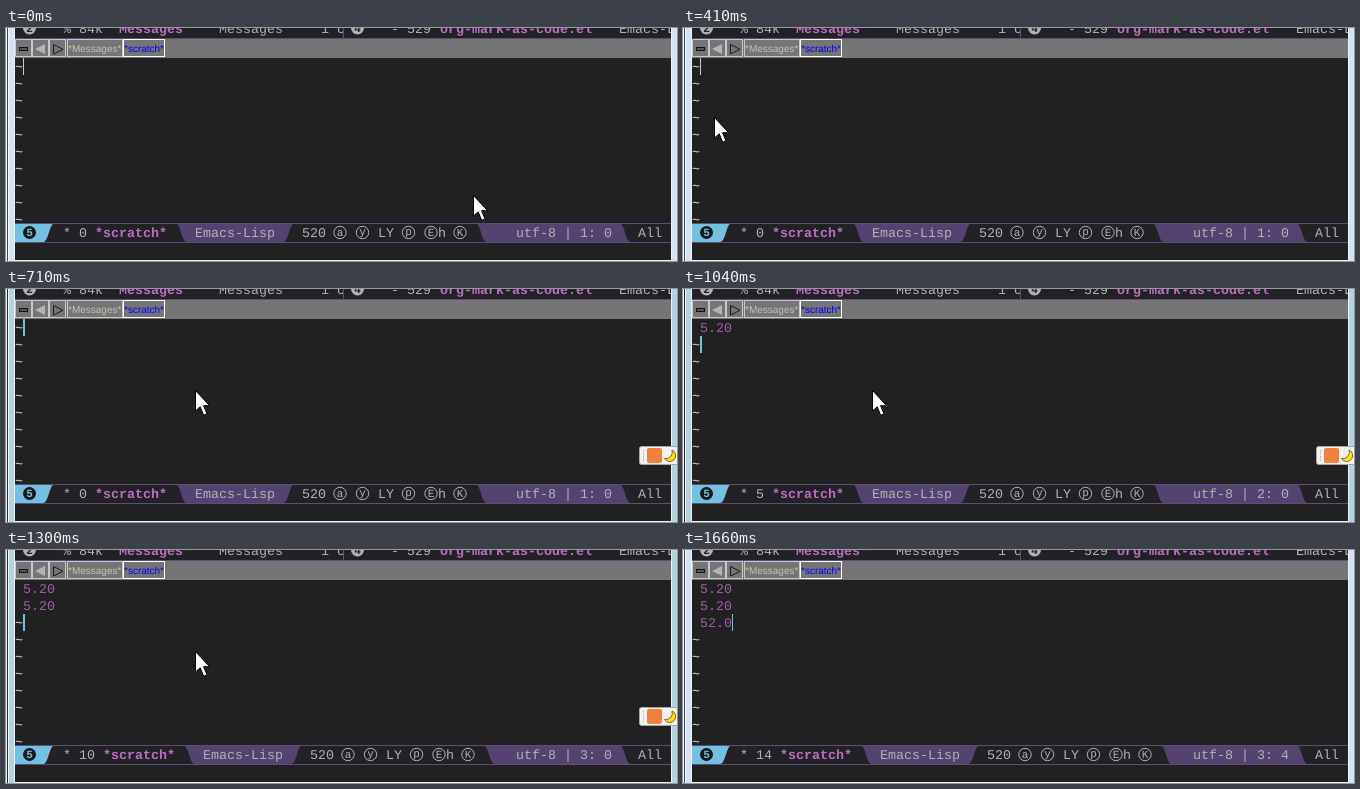
Recreate the animation shown at these times as an HTML page. Size 671 by 233 pixels, loop 1760 ms.

```html
<!DOCTYPE html>
<html lang="en">
<head>
<meta charset="utf-8">
<title>Editor typing</title>
<style>
  html, body { margin: 0; width: 100%; height: 100%; overflow: hidden; background: #212121; }
  svg { display: block; width: 671px; height: 233px; }
  text { font: 13.33px "Liberation Mono", monospace; fill: #b2b2b2; white-space: pre; text-rendering: geometricPrecision; }
  .name { font-weight: bold; fill: #bc6ec5; }
  .number { fill: #a45bad; }
  .tilde { fill: #e0e0e0; }
  .tab { font: 10px "Liberation Sans", Arial, sans-serif; }
  .badge { font-size: 11px; text-anchor: middle; }
  .purple { fill: #544370; }
  .dark { fill: #222226; }
  .rule { fill: #5d4d7a; }
  .button { fill: #757575; stroke: #c8c8c8; }
</style>
</head>
<body>
<svg viewBox="0 0 671 233">
  <rect width="671" height="233" fill="#212121"/>

  <!-- mode lines of the upper windows -->
  <g>
    <rect class="dark" x="9" width="656" height="10"/>
    <circle cx="23.5" cy="0" r="6.5" fill="#b2b2b2"/>
    <text class="badge" x="23.5" y="3.5" style="fill:#222226;font-weight:bold">2</text>
    <text x="57" y="5">% 84k</text>
    <text class="name" x="105" y="5">*Messages*</text>
    <text x="213" y="5">Messages</text>
    <text x="315" y="5">1 c</text>
    <rect class="rule" x="337" width="1" height="10"/>
    <circle cx="351.5" cy="0" r="6.5" fill="#b2b2b2"/>
    <text class="badge" x="351.5" y="3.5" style="fill:#222226;font-weight:bold">4</text>
    <text x="385" y="5">- 529</text>
    <text class="name" x="434" y="5">org-mark-as-code.el</text>
    <text x="613" y="5">Emacs-L</text>
    <rect class="rule" x="9" y="10" width="656" height="1"/>
  </g>

  <!-- tab bar -->
  <g>
    <rect x="9" y="11" width="656" height="19" fill="#757575"/>
    <rect class="button" x="9.5" y="11.5" width="16" height="17"/>
    <rect class="button" x="26.5" y="11.5" width="16" height="17"/>
    <rect class="button" x="43.5" y="11.5" width="16" height="17"/>
    <rect x="13.5" y="19.5" width="8" height="3" fill="#555" stroke="#111"/>
    <path d="M39 16V26L29 21Z" fill="#b4b4b4"/>
    <path d="M47.5 16.5V26L57 21.3Z" fill="none" stroke="#1c1c1c"/>
    <rect class="button" x="61.5" y="11.5" width="55" height="17"/>
    <text class="tab" x="62" y="24" style="fill:#c9c0b4">*Messages*</text>
    <rect x="117.5" y="11.5" width="41" height="17" fill="#757575" stroke="#fff"/>
    <text class="tab" x="118" y="24" style="fill:#00f">*scratch*</text>
  </g>

  <g id="buffer"></g>
  <rect id="caret" height="17"/>

  <!-- active mode line -->
  <g>
    <rect class="dark" x="9" y="195" width="656" height="19"/>
    <path class="purple" d="M400 195H613C619 195 619 214 625 214H400Z"/>
    <g id="shifted">
      <path class="dark" d="M390 195H469C475 195 475 214 481 214H390Z"/>
      <path class="purple" d="M169 195H289C283 195 283 214 277 214H181C175 214 175 195 169 195Z"/>
      <text class="name" x="89" y="209">*scratch*</text>
      <text x="189" y="209">Emacs-Lisp</text>
      <text x="296" y="209">520</text>
      <text x="372" y="209">LY</text>
      <text x="432" y="209">h</text>
      <g id="badges"></g>
    </g>
    <path d="M9 195H49C43 195 43 214 37 214H9Z" fill="#74c0e0"/>
    <circle cx="23.5" cy="204.5" r="6.5" fill="#18181a"/>
    <text class="badge" x="23.5" y="208.4" style="fill:#74c0e0;font-weight:bold">5</text>
    <text id="size" x="57" y="209"></text>
    <text id="position" x="510" y="209"></text>
    <text x="632" y="209">All</text>
    <rect class="rule" x="9" y="195" width="656" height="1"/>
    <rect class="rule" x="9" y="214" width="656" height="1"/>
  </g>

  <!-- window frame -->
  <g>
    <rect width="1" height="233" fill="#f4f6f8"/>
    <rect id="edge" x="1" width="1" height="233"/>
    <rect x="2" width="1" height="233" fill="#f6fafc"/>
    <rect class="frame" x="3" width="6" height="233"/>
    <rect class="frame" x="665" width="6" height="233"/>
    <path d="M8.5 0V232.5H665.5V0" fill="none" stroke="#eaf3fb"/>
  </g>

  <!-- input method bar -->
  <g id="inputBar">
    <rect x="633.5" y="157.5" width="40" height="18" rx="2" fill="#f3f1f1" stroke="#a9a5a5"/>
    <path d="M637.5 161V173" stroke="#aaa" stroke-dasharray="1 1"/>
    <rect x="641" y="159" width="15" height="15" rx="2" fill="#ee813b"/>
    <path d="M666 161A6 6 0 1 1 658.5 169.5A6.5 6.5 0 0 0 666 161Z" fill="#ffdf16" stroke="#5e5000" stroke-width=".8"/>
  </g>

  <path id="pointer" d="M.5 .5V21L5.2 16.8L8.7 25.3L12 23.9L8.6 15.7H14.6Z" fill="#fff" stroke="#000"/>
</svg>
<script>
  const LOOP = 1760, ROWS = 10, ROW_HEIGHT = 17, CHAR_WIDTH = 8, TOP = 30;
  const FOCUS_IN = 710, FOCUS_OUT = 1660;

  // Each entry: start time, then the value held until the next entry.
  const pointerPath = [
    [0, [467, 167]], [100, [447, 163]], [200, [374, 147]],
    [310, [190, 113]], [410, [31, 89]], [610, [189, 101]]
  ];
  const typing = [
    [0, ""], [810, "5"], [910, "5.2"], [1010, "5.20"], [1040, "5.20\n"],
    [1080, "5.20\n5"], [1100, "5.20\n5."], [1200, "5.20\n5.20"], [1300, "5.20\n5.20\n"],
    [1350, "5.20\n5.20\n5"], [1400, "5.20\n5.20\n52."], [1470, "5.20\n5.20\n52.0"]
  ];

  const byId = id => document.getElementById(id);
  const setAttrs = (node, attrs) => {
    for (const key in attrs) node.setAttribute(key, attrs[key]);
    return node;
  };
  const add = (parent, tag, attrs, text = "") => {
    const node = setAttrs(document.createElementNS("http://www.w3.org/2000/svg", tag), attrs);
    node.textContent = text;
    return parent.appendChild(node);
  };
  const valueAt = (steps, time) => steps.filter(step => step[0] <= time).pop()[1];

  const rows = Array.from({ length: ROWS }, (_, i) =>
    add(byId("buffer"), "text", { y: TOP + 13 + i * ROW_HEIGHT }));

  [["a", 334], ["y", 356.5], ["p", 402.5], ["E", 425], ["K", 454]].forEach(([letter, x]) => {
    add(byId("badges"), "circle", { cx: x, cy: 204.5, r: 6.2, fill: "none", stroke: "#b2b2b2" });
    add(byId("badges"), "text", { class: "badge", x, y: /[yp]/.test(letter) ? 207 : 208 }, letter);
  });

  function render(time) {
    const focused = time >= FOCUS_IN && time < FOCUS_OUT;
    const content = valueAt(typing, time);
    const lines = content.split("\n");
    const last = lines.length - 1;
    const column = lines[last].length;

    rows.forEach((row, i) => {
      const line = lines[i];
      setAttrs(row, { x: line ? 17 : 9, class: line ? "number" : "tilde" });
      row.textContent = line || "~";
    });
    setAttrs(byId("caret"), {
      x: 17 + column * CHAR_WIDTH, y: TOP + last * ROW_HEIGHT,
      width: focused ? 2 : 1, fill: time >= FOCUS_IN ? "#74c0e0" : "#c8c8c8"
    });

    byId("size").textContent = "* " + content.length;
    byId("position").textContent = `utf-8 | ${last + 1}: ${column}`;
    byId("shifted").setAttribute("transform", `translate(${content.length > 9 ? CHAR_WIDTH : 0})`);

    byId("edge").setAttribute("fill", focused ? "#202a30" : "#3c4654");
    document.querySelectorAll(".frame").forEach(bar =>
      bar.setAttribute("fill", focused ? "#b5d3df" : "#d5e2f3"));
    byId("inputBar").style.display = focused ? "" : "none";

    byId("pointer").style.display = time < FOCUS_OUT ? "" : "none";
    byId("pointer").setAttribute("transform", `translate(${valueAt(pointerPath, time)})`);
  }

  const start = performance.now();
  function tick() {
    render((performance.now() - start) % LOOP);
    requestAnimationFrame(tick);
  }
  tick();
</script>
</body>
</html>
```
